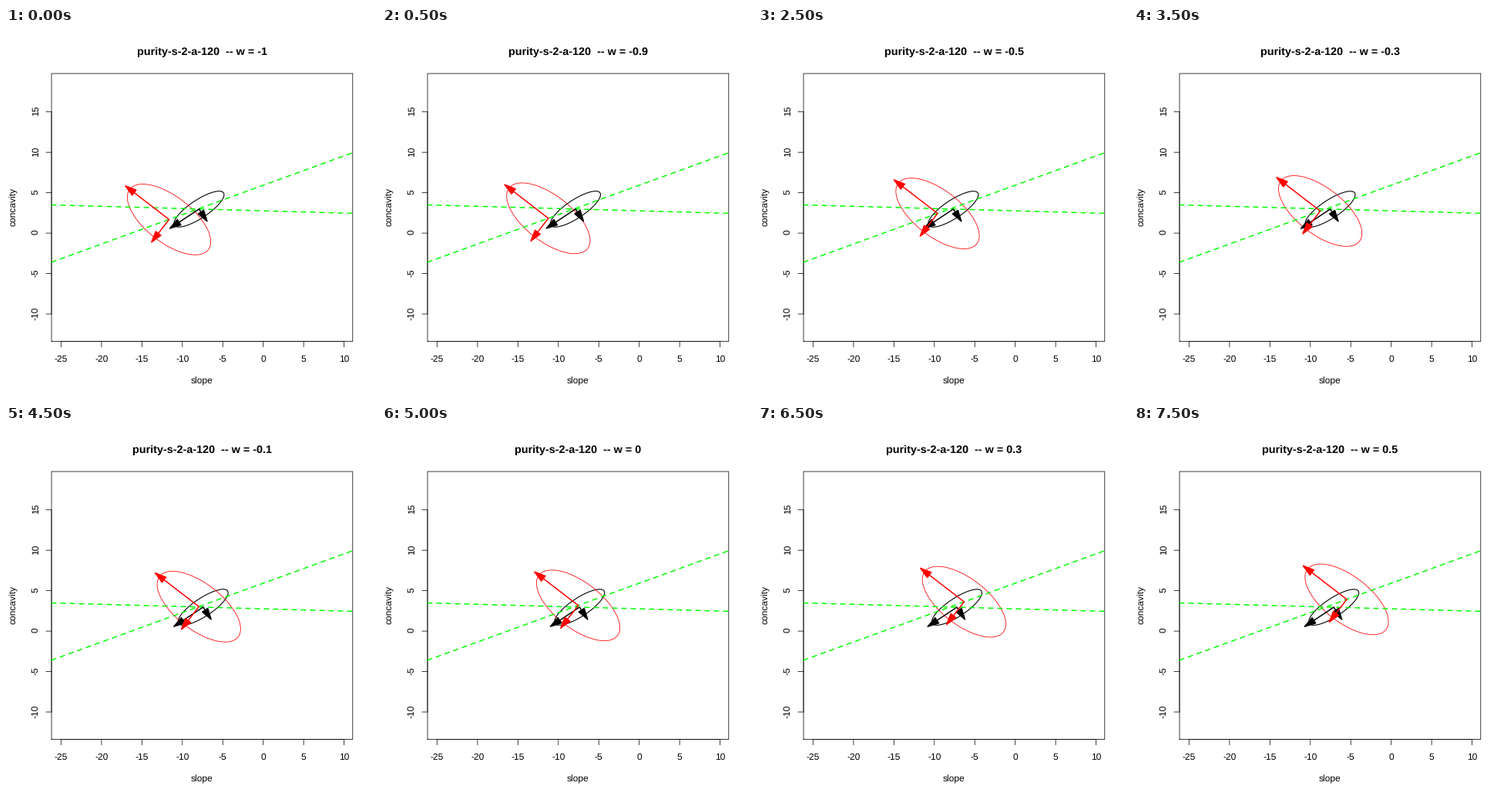
Recreate the animation shown at these times as a matplotlib script. Size 480 by 480 pixels, loop 8 s.

```python
import numpy as np
import matplotlib.pyplot as plt
from matplotlib.animation import FuncAnimation
from matplotlib.patches import Polygon

SIZE, DPI = 480, 100
PX = 72 / DPI                      # points per pixel
LEFT, RIGHT, TOP, BOTTOM = 59.04, 449.76, 59.04, 406.56
THIN, THICK = 0.75, 1.5
TICK = 7.2
STEPS = 16
GREEN = "#00ff00"
HEAD = np.array([[7.2, 0], [-7.2, 4.2], [-7.2, -4.2]])

plt.rcParams["font.family"] = "Liberation Sans"
plt.rcParams["text.hinting"] = "none"
fig = plt.figure(figsize=(SIZE / DPI, SIZE / DPI), dpi=DPI, facecolor="white")
ax = fig.add_axes([0, 0, 1, 1])
ax.set(xlim=(0, SIZE), ylim=(SIZE, 0))
ax.axis("off")


def to_x(v):
    return 333.7 + 10.49 * v


def to_y(v):
    return 266.1 - 10.49 * v


def line(xs, ys, color="black", width=THIN, **kw):
    kw.setdefault("solid_capstyle", "round")
    return ax.plot(xs, ys, color=color, lw=width * PX, snap=False, **kw)[0]


def label(x, y, text, size=12, **kw):
    return ax.text(x, y, text, fontsize=size * PX, ha="center", va="baseline",
                   rotation_mode="anchor", **kw)


def draw_axes():
    line([LEFT, RIGHT, RIGHT, LEFT, LEFT], [BOTTOM, BOTTOM, TOP, TOP, BOTTOM])
    # Axis lines run over the box between the outermost ticks.
    line([to_x(-25), to_x(10)], [BOTTOM, BOTTOM])
    line([LEFT, LEFT], [to_y(-10), to_y(15)])
    for v in range(-25, 11, 5):
        line([to_x(v)] * 2, [BOTTOM, BOTTOM + TICK])
        label(to_x(v), 433, str(v))
    for v in range(-10, 16, 5):
        line([LEFT - TICK, LEFT], [to_y(v)] * 2)
        label(41.8, to_y(v) - 1, str(v), rotation=90)
    label(254.4, 462, "slope")
    label(13, 231.8, "concavity", rotation=90)


class Spread:
    """An ellipse with an arrow along each principal axis."""

    def __init__(self, color, start, step, major, minor, axis, width):
        self.start, self.step = np.array(start), np.array(step)
        u = np.array(axis) / np.hypot(*axis)
        v = np.array([u[1], -u[0]])
        t = np.linspace(0, 2 * np.pi, 201)
        self.curve = major * np.outer(np.cos(t), u) + minor * np.outer(np.sin(t), v)
        self.outline = line([], [], color, width, zorder=2)
        self.arrows = []
        for length, d in ((major, u), (minor, v)):
            turn = np.array([d, [-d[1], d[0]]])
            shaft = line([], [], color, THICK, zorder=4)
            head = Polygon(HEAD, closed=True, fc=color, ec=color, lw=THICK * PX,
                           joinstyle="round", zorder=4)
            ax.add_patch(head)
            self.arrows.append((shaft, head, length * d, HEAD @ turn))

    def place(self, i):
        c = self.start + i * self.step
        self.outline.set_data(*(c + self.curve).T)
        for shaft, head, end, shape in self.arrows:
            shaft.set_data(*np.array([c, c + end]).T)
            head.set_xy(c + end + shape)


draw_axes()
for y0, y1 in ((303.8, 161.8), (229.5, 240.4)):
    line([LEFT, RIGHT], [y0, y1], GREEN, THICK, zorder=3,
         linestyle=(0, (4, 4)), dash_capstyle="round")

title = label(254.4, 35, "", size=14.4, weight="bold")
spreads = [
    Spread("black", (250.4, 234.9), (0.585, 0.016), 38.2, 11.8, (-0.834, 0.552), 1.1),
    Spread("red", (211.5, 248.4), (4.3, -1.565), 64.3, 30.0, (-0.792, -0.61), 0.8),
]


def update(i):
    w = (i - 10) / 10
    title.set_text(f"purity-s-2-a-120  -- w = {w:g}")
    for s in spreads:
        s.place(i)
    return []


anim = FuncAnimation(fig, update, frames=STEPS, interval=500,
                     repeat=True, repeat_delay=0, blit=False)
plt.show()
```
